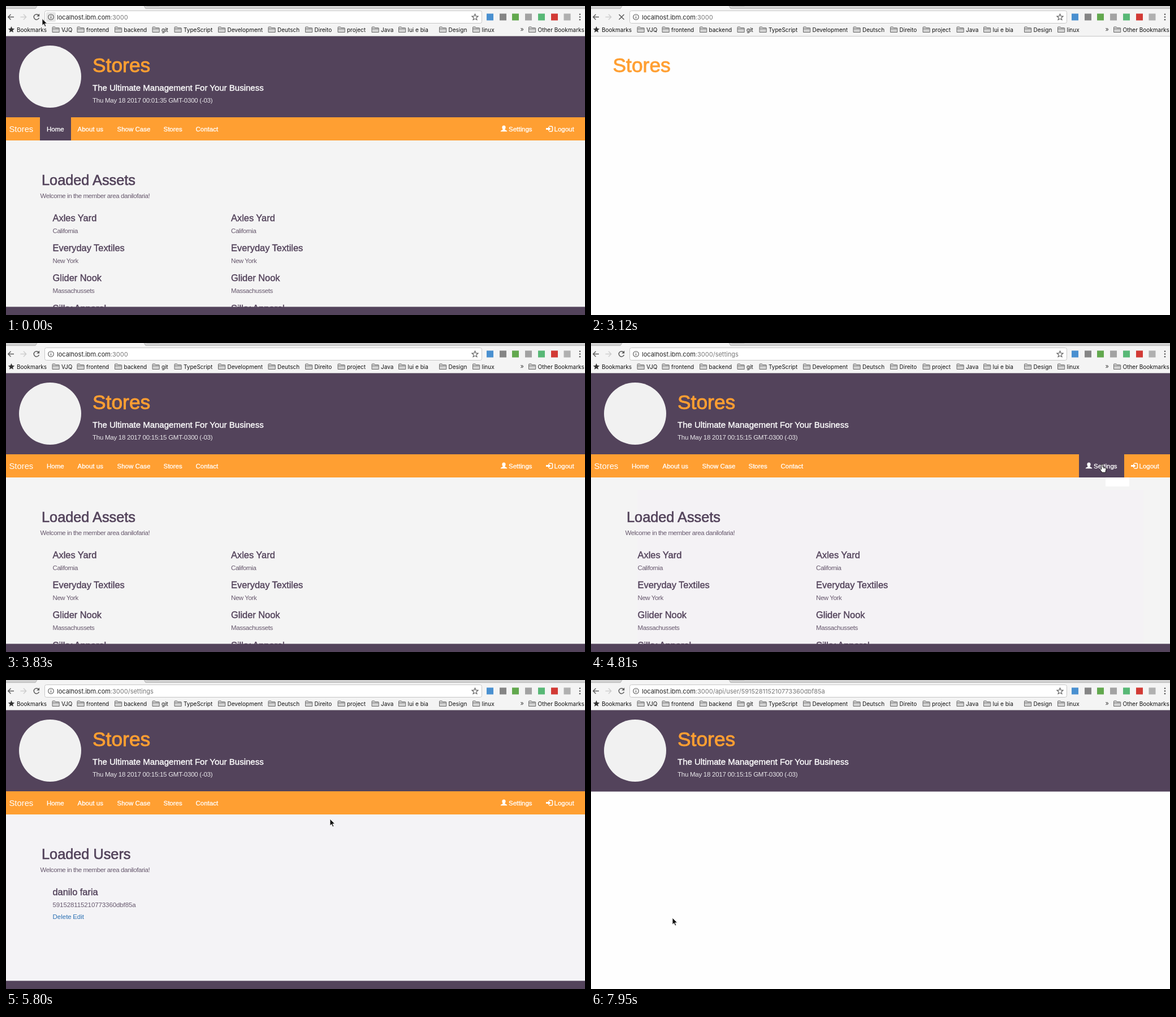
An HTML page for the animation above (8000 ms loop, 1024 px wide and 547 px high).

```html
<!DOCTYPE html>
<html lang="en">
<head>
<meta charset="utf-8">
<title>Stores</title>
<style>
  html, body { margin: 0; width: 100%; height: 100%; overflow: hidden; background: #fff; }
  svg { display: block; width: 100%; height: 100%; font-family: "Liberation Sans", Arial, sans-serif; }
  .ui { font-family: Inter, "Open Sans", sans-serif; }
  text { white-space: pre; }
</style>
</head>
<body>
<svg id="stage" viewBox="0 0 1024 547"></svg>
<script>
const LOOP = 8000;
const PLUM = '#53435b', ORANGE = '#ff9f32', WHITE = '#fff';
const USER_ID = '591528115210773360dbf85a';
const stage = document.getElementById('stage');

const rect = (x, y, w, h, fill, more = '') =>
  `<rect x="${x}" y="${y}" width="${w}" height="${h}" fill="${fill}" ${more}/>`;
const circle = (x, y, r, fill, more = '') =>
  `<circle cx="${x}" cy="${y}" r="${r}" fill="${fill}" ${more}/>`;
const line = (d, color, width = 1.4) =>
  `<path d="${d}" fill="none" stroke="${color}" stroke-width="${width}"/>`;
const shape = (d, fill, more = '') => `<path d="${d}" fill="${fill}" ${more}/>`;
const text = (x, y, size, str, fill, more = '') =>
  `<text x="${x}" y="${y}" font-size="${size}" fill="${fill}" ${more}>${str}</text>`;
// Medium weight: regular glyphs with a thin outline
const medium = (x, y, size, str, fill, more = '') =>
  text(x, y, size, str, fill, `stroke="${fill}" stroke-width="${size * 0.026}" ${more}`);
const light = (x, y, str, fill, gap = -0.42) =>
  text(x, y, 11.5, str, fill, `letter-spacing="${gap}" opacity=".88"`);

function star(cx, cy, r) {
  let d = '';
  for (let i = 0; i < 10; i++) {
    const a = i * Math.PI / 5, q = i % 2 ? r * 0.45 : r;
    d += `${i ? 'L' : 'M'}${(cx + q * Math.sin(a)).toFixed(2)} ${(cy - q * Math.cos(a)).toFixed(2)}`;
  }
  return d + 'z';
}

const folder = x =>
  shape(`M${x} 46.5v-8.5q0-1 1-1h3.4l1.2 1.6h5.6q1 0 1 1v6.9z`, '#d3d3d3', 'stroke="#6a6a6a"') +
  line(`M${x} 40.6h12.2`, '#6a6a6a', 0.9);

const bookmarks = [
  [82, 'VJQ'], [126, 'frontend'], [192.5, 'backend'], [259, 'git'], [298, 'TypeScript'],
  [375.5, 'Development'], [464, 'Deutsch'], [529.5, 'Direito'], [587, 'project'],
  [647, 'Java'], [694.5, 'lui e bia'], [766.5, 'Design'], [825.5, 'linux'], [924.5, 'Other Bookmarks']
];
const extensions = [
  [856, '#4a90d0'], [879, '#858585'], [901, '#62a84e'], [924, '#a2a2a2'],
  [947, '#58b876'], [970, '#d23a35'], [992.5, '#b0b0b0']
];

const browserBar =
  rect(0, 0, 1024, 54, '#f4f4f4') + rect(0, 0, 1024, 5, '#d2d2d2') +
  shape('M52 5.5L55 0H244L247 5.5z', '#f4f4f4') +
  line('M0 4.6H52L55 0M244 0L247 4.6H1024', '#b4b4b4', 0.9) +
  shape('M248 0h22l2 1h-22z', '#bdbdbd') +
  rect(0, 53, 1024, 1, '#c6c6c6') +
  line('M14 19.5H4M8.5 14.8L3.8 19.5L8.5 24.2', '#5a5a5a') +
  line('M25.5 19.5h10M31 14.8l4.7 4.7l-4.7 4.7', '#cdcdcd') +
  rect(68.5, 8.5, 773, 22, WHITE, 'rx="3" stroke="#c6c6c6"') +
  `<path d="${star(829.5, 20, 5.8)}" fill="none" stroke="#5a5a5a" stroke-width="1.1"/>` +
  extensions.map(([x, c]) => rect(x - 6, 13.5, 12, 12, c)).join('') +
  [14.8, 19.5, 24.2].map(y => circle(1015, y, 1.3, '#5a5a5a')).join('') +
  shape(star(9.5, 42, 6), '#333') +
  `<g class="ui">${text(19, 45.5, 10, 'Bookmarks', '#111')}${text(909.5, 45, 11, '»', '#444')}` +
  bookmarks.map(([x, name]) => folder(x) + text(x + 16, 45.5, 10, name, '#111')).join('') + '</g>';

const reloadIcon =
  line('M58 17A4.7 4.7 0 1 0 58.4 21', '#5a5a5a', 1.5) + shape('M59.2 13.6v5h-5z', '#5a5a5a');
const stopIcon = line('M49.5 15l9 9M58.5 15l-9 9', '#5a5a5a', 1.5);

function toolbar(s) {
  return browserBar +
    (s.pressed ? rect(44, 10, 19, 19, '#d9d9d9', 'rx="2"') : '') +
    (s.loading ? stopIcon : reloadIcon) +
    (s.infoHover ? rect(71, 11, 17, 17, '#e6e6e6', 'rx="2"') : '') +
    circle(79.5, 19.5, 4.8, 'none', 'stroke="#5a5a5a" stroke-width="1.1"') +
    line('M79.5 18.7v3.5M79.5 16.5v1.2', '#5a5a5a', 1.2) +
    `<text class="ui" x="90" y="23.5" font-size="11" fill="#222">localhost.ibm.com<tspan fill="#777">:3000${s.path}</tspan></text>`;
}

const header = s =>
  rect(0, 53.5, 1024, 144, PLUM, `fill-opacity="${s.fade}"`) +
  circle(78, 125, 55, '#f1f1f1') +
  medium(153, 117, 35.4, 'Stores', ORANGE) +
  medium(153, 150, 15, 'The Ultimate Management For Your Business', WHITE) +
  light(153, 171, `Thu May 18 2017 ${s.clock} GMT-0300 (-03)`, WHITE, -0.26);

function nav(s) {
  const links = [[72, 'Home'], [126.5, 'About us'], [196.5, 'Show Case'], [278.5, 'Stores'],
    [335.5, 'Contact'], [889, 'Settings'], [969.5, 'Logout']];
  return rect(0, 197, 1024, 41, ORANGE, `fill-opacity="${s.fade}"`) +
    (s.home ? rect(60, 197, 55, 41, PLUM) : '') +
    (s.settings ? rect(863, 197, 80, 41, PLUM) : '') +
    text(5.5, 223, 14.8, 'Stores', WHITE) +
    links.map(([x, name]) => medium(x, 221.7, 11.5, name, WHITE)).join('') +
    shape('M880.5 211.5c4 0 3.6 5 1.8 6.8c0 1.6 4 1.4 4 4h-11.6c0-2.6 4-2.4 4-4c-1.8-1.8-2.2-6.8 1.8-6.8z', WHITE) +
    line('M960.5 213h4q2 0 2 2v5q0 2-2 2h-4', WHITE, 1.5) +
    shape('M955 216h4v-2.6l4.3 4.1l-4.3 4.1V219h-4z', WHITE);
}

function assets() {
  const shops = [['Axles Yard', 'California'], ['Everyday Textiles', 'New York'],
    ['Glider Nook', 'Massachussets'], ['Silky Apparel', '']];
  return [82.5, 398].map(x => shops.map(([name, place], i) =>
    medium(x, 380.6 + 53.4 * i, 16.4, name, PLUM) +
    light(x, 401.5 + 53.4 * i, place, PLUM)).join('')).join('');
}

const users = s =>
  medium(82.5, 380.6, 16.4, 'danilo faria', PLUM) +
  light(82.5, 401.5, USER_ID, PLUM, -0.1) +
  text(82.5, 423, 11.5, 'Delete', '#2b70b3') +
  text(118.2, 423, 11.5, 'Edit', '#2b70b3', s.editHover ? 'text-decoration="underline"' : '');

function content(s) {
  const body =
    medium(63, 316.5, 25.3, s.users ? 'Loaded Users' : 'Loaded Assets', PLUM, `opacity="${s.fade}"`) +
    light(60.5, 340, 'Welcome in the member area danilofaria!', PLUM) +
    (s.users ? users(s) : assets());
  const footer = rect(0, 532.5, 1024, 15, PLUM, `fill-opacity="${s.fade}"`);
  return rect(0, 238, 1024, 309, s.tintAll ? '#f4f3f6' : '#f4f4f4', `fill-opacity="${s.fade}"`) +
    (s.tintBox ? rect(82, 260, 895, 287, '#f4f2f5') : '') +
    (s.tip ? rect(910, 238, 42, 16, WHITE) : '') +
    (s.fade < 1 ? footer + body : body + footer);
}

// [start, x, y, hand]; no position means the pointer is off the stage
const pointerSteps = [
  [0, 64, 22.5], [150, 57, 22], [320, 51, 20], [1700, 150, 121.5], [1850, 189, 146],
  [2140, 637, 174], [2440, 889, 454], [2580],
  [4130, 878, 420], [4450, 904, 215, 1], [5350, 800, 246], [5800, 573, 246],
  [5960, 500, 268], [6120, 425, 296], [6280, 352, 330], [6440, 285, 368], [6600, 228, 402],
  [6750, 190, 428], [6900, 165, 447], [7050, 148, 436], [7200, 131, 417, 1], [7800, 144, 421]
];
const pointerAt = t => pointerSteps.filter(p => p[0] <= t).pop();

function pointer([, x, y, hand]) {
  if (x === undefined) return '';
  const art = hand
    ? shape('M-1.3 .3q1.3-1.6 2.6 0v4.4l4.3 1q1.9.6 1.5 2.6l-1.2 5.9h-6l-4.1-5.6q.2-2.1 2.9-.2z',
        WHITE, 'stroke="#111"') + line('M2.7 5.2v2.4M4.8 5.7v2', '#111', 0.7)
    : shape('M0 0v12l2.8-2.6l2 4.5l2-.9l-2-4.3h3.9z', '#111', 'stroke="#fff" stroke-width=".8"');
  return `<g transform="translate(${x} ${y})">${art}</g>`;
}

function stateAt(t) {
  const within = (a, b) => t >= a && t < b;
  return {
    blank: within(3120, 3470),
    bare: t >= 7950,
    fade: within(3470, 3830) ? 0.44 : 1,
    clock: t < 3120 ? '00:01:35' : '00:15:15',
    loading: within(320, 3470) || within(7650, 7950),
    pressed: within(150, 3120),
    infoHover: t < 150,
    path: t < 4630 ? '' : t < 7650 ? '/settings' : '/api/user/' + USER_ID,
    home: t < 3120,
    settings: within(4450, 5350),
    tintBox: within(4130, 5350),
    tintAll: t >= 5350,
    tip: within(4630, 5350),
    users: t >= 4990,
    editHover: within(7200, 7800),
    pointer: pointerAt(t)
  };
}

function scene(s) {
  const page = s.blank ? medium(38.5, 117, 35.4, 'Stores', ORANGE)
    : header(s) + (s.bare ? '' : nav(s) + content(s));
  return rect(0, 0, 1024, 547, '#fefefe') + toolbar(s) + page + pointer(s.pointer);
}

let shown = '';
const start = performance.now();
function draw() {
  const state = stateAt((performance.now() - start) % LOOP);
  const key = JSON.stringify(state);
  if (key !== shown) {
    stage.innerHTML = scene(state);
    shown = key;
  }
  requestAnimationFrame(draw);
}
draw();
</script>
</body>
</html>
```
